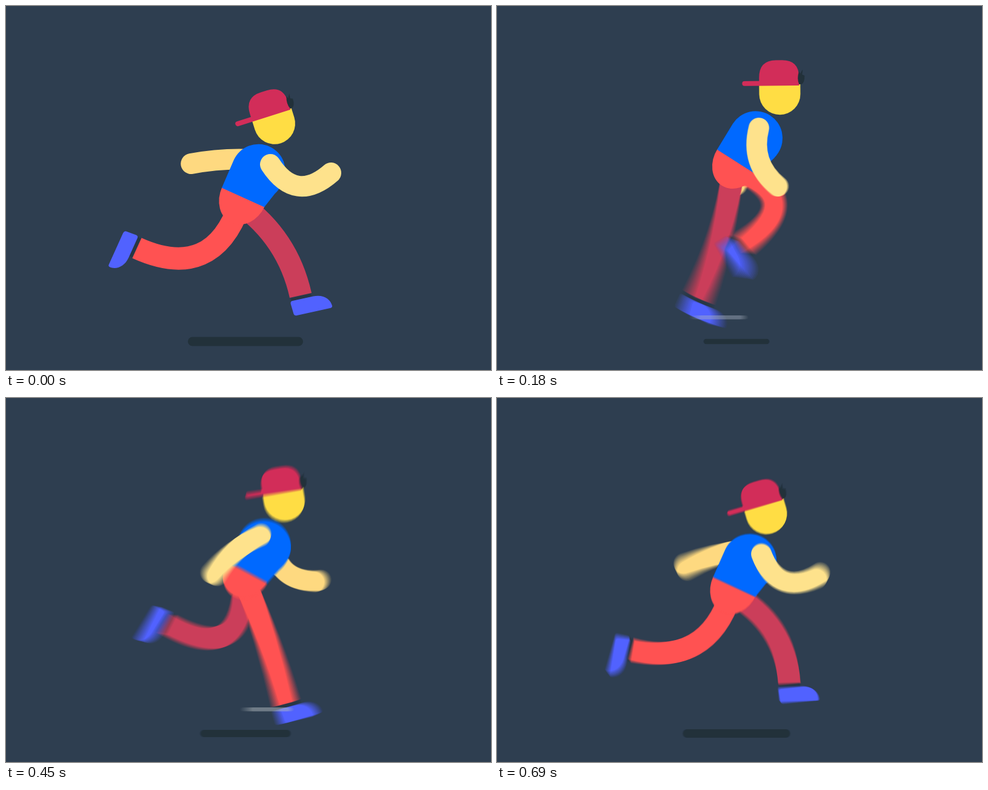
An HTML page with a canvas for the animation above (0.72 s loop, 800 by 600 pixels).

```html
<!DOCTYPE html>
<html lang="en">
<head>
<meta charset="utf-8">
<title>Runner</title>
<style>
html, body { margin: 0; width: 100%; height: 100%; overflow: hidden; background: #2e3e50; }
canvas { display: block; }
</style>
</head>
<body>
<canvas id="stage" width="800" height="600"></canvas>
<script>
const W = 800, H = 600, LOOP = 720, STEP = 30, SHUTTER = 15, SAMPLES = 12;
const { PI, sin, cos, atan2, hypot } = Math;
const COLOR = {
  bg: '#2e3e50', dark: '#22313a', cap: '#d22d59', face: '#ffdd44', shirt: '#0069ff',
  leg: '#ff5252', farLeg: '#cb3e5a', shoe: '#5162ff', arm: '#fee28c', farArm: '#fed980'
};

const stage = document.getElementById('stage').getContext('2d');
const layer = document.createElement('canvas');
layer.width = W;
layer.height = H;
const g = layer.getContext('2d');

const rad = deg => deg * PI / 180;
const mix = (a, b, p) => a + (b - a) * p;
const stride = t => 2 * PI * t / LOOP;

function fill(path, color) {
  g.fillStyle = color;
  g.fill(new Path2D(path));
}

function local(x, y, angle, paint) {
  g.save();
  g.translate(x, y);
  g.rotate(angle);
  paint();
  g.restore();
}

function pill(x, y, w, h, color) {
  g.beginPath();
  g.roundRect(x, y, w, h, Math.min(w, h) / 2);
  g.fillStyle = color;
  g.fill();
}

// Curved limb bulging sideways by `sag`; returns its direction at the end
function hose(x, y, ex, ey, sag, width, cap, color) {
  const dx = ex - x, dy = ey - y, k = 2 * sag / hypot(dx, dy);
  const cx = (x + ex) / 2 + dy * k, cy = (y + ey) / 2 - dx * k;
  g.beginPath();
  g.moveTo(x, y);
  g.quadraticCurveTo(cx, cy, ex, ey);
  g.lineWidth = width;
  g.lineCap = cap;
  g.strokeStyle = color;
  g.stroke();
  return atan2(ey - cy, ex - cx);
}

function leg(t, lift, color) {
  const a = stride(t);
  const x = 358 - 143 * cos(a) + 24 * sin(a) - 7 * cos(2 * a) + 8 * cos(3 * a) - 12 * sin(3 * a);
  const y = 438 - 44 * cos(a) - 44 * sin(a) + 5 * cos(3 * a) - 6 * sin(4 * a);
  const sag = 34 + 31 * cos(stride(t - 115));
  const heading = hose(386, 297 + 29 * lift, x, y, sag, 37, 'butt', color);
  local(x, y, heading - PI / 2, () => {
    fill('M-17 1H17V6H-17Z', '#283743');
    fill('M-15 6H20C37 6 47 17 47 28Q47 31 44 31H-13Q-18 31-18 26L-19 10Q-19 6-15 6Z', COLOR.shoe);
  });
}

// The hand keeps its distance from the shoulder and swings like a pendulum
function arm(t, lift, color) {
  const a = stride(t), swing = cos(a) + 0.5 * sin(a) ** 2;
  const x = 421 + 15 * swing, y = 228 + 29 * lift + 4 * swing;
  const angle = rad(92 - 66 * cos(a) - 20 * sin(a) - 18 * cos(3 * a));
  hose(x, y, x + 101 * cos(angle), y + 101 * sin(angle), -16 - 13 * cos(a), 34, 'round', color);
}

function torso(lift) {
  local(391.5 - 0.5 * lift, 286.4 + 29.2 * lift, rad(28.5 - 4 * lift), () => {
    fill('M-38.5-1A38.5 47 0 0 0 38.5-1Z', COLOR.leg);
    fill('M-38.5 0L-39.5-50A44.5 44.5 0 0 1 49.5-50Q49.5-38 45-27L38.5 0Z', COLOR.shirt);
  });
}

function head(lift) {
  local(453 - 10 * lift, 169.5 + 24.3 * lift, rad(-9 - 8.5 * lift), () => {
    fill('M-34-16H34V0A34 34 0 0 1-34 0Z', COLOR.face);
    fill('M-58-22H-34V-27Q-34-56-6-56H4Q32-56 32-28V-14H-58A4 4 0 0 1-58-22Z', COLOR.cap);
    fill('M32-16Q28-25 32-37L34-33L38-40L37-32L41-30Q41-19 36-16Z', COLOR.dark);
  });
}

function shadow(t) {
  const w = 106 + 84 * Math.abs((t + LOOP) % 360 / 180 - 1);
  pill(395 - w / 2, 553 - w * 0.0395, w, w * 0.079, COLOR.dark);
}

// Dust line whose front end runs off first and whose back end catches up
function streak(age, x) {
  const p = age / 180;
  if (p < 0 || p > 1) return;
  const left = x - 204 * (1 - (1 - p) ** 1.4), right = x - 178 * p * p;
  const fade = p * p;
  g.globalAlpha = mix(0.75, 0.05, p);
  pill(left - 3, 510, right - left + 3, 6.5,
    `rgb(${mix(205, 70, fade)},${mix(213, 78, fade)},${mix(190, 240, fade)})`);
  g.globalAlpha = 1;
}

function scene(t) {
  const lift = cos(2 * stride(t));
  g.fillStyle = COLOR.bg;
  g.fillRect(0, 0, W, H);
  shadow(t);
  g.save();
  g.translate(3.5 * (1 - cos(stride(t))), 0);
  arm(t + LOOP / 2, lift, COLOR.farArm);
  leg(t + LOOP / 2, lift, COLOR.farLeg);
  leg(t, lift, COLOR.leg);
  torso(lift);
  head(lift);
  arm(t, lift, COLOR.arm);
  g.restore();
  streak(t - 100, 444);
  streak(t - 385, 494);
}

// Average several moments within the shutter; the opening pose stays sharp
function render(t) {
  const count = t ? SAMPLES : 1;
  for (let i = 0; i < count; i++) {
    scene(count > 1 ? t + SHUTTER * (i / (count - 1) - 0.5) : t);
    stage.globalAlpha = 1 / (i + 1);
    stage.drawImage(layer, 0, 0);
  }
}

let start = null, shown = 0;
function tick(now) {
  if (start === null) start = now;
  const t = Math.floor((now - start) % LOOP / STEP) * STEP;
  if (t !== shown) render(shown = t);
  requestAnimationFrame(tick);
}
render(0);
requestAnimationFrame(tick);
</script>
</body>
</html>
```
